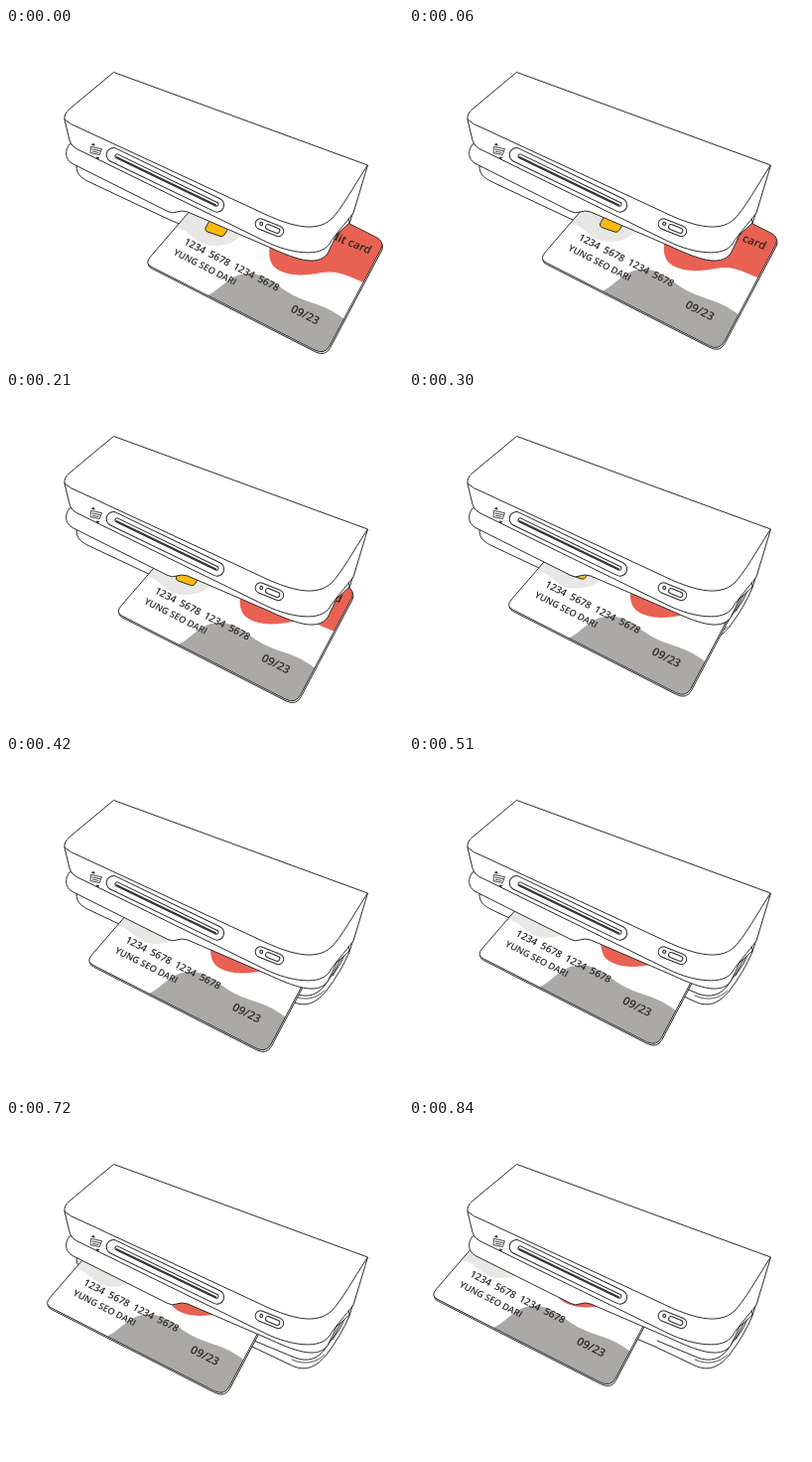
These frames come from a looping animation (400 by 338 pixels, 0.91 s). An HTML page:

```html
<!DOCTYPE html>
<html lang="en">
<head>
<meta charset="utf-8">
<title>Card reader</title>
<style>
  html, body { margin: 0; width: 100%; height: 100%; overflow: hidden; background: #fff; }
  svg { display: block; width: 400px; height: 338px; }
  .line { fill: none; stroke: #2b2b2b; stroke-width: 1; stroke-linecap: round; stroke-linejoin: round; }
  .solid { fill: #fff; }
  .thin { stroke-width: .8; }
  .ink { fill: #2b2b2b; }
  text { font: 600 10px "Open Sans", "Noto Sans", sans-serif; fill: #2b2727; }
  .number { word-spacing: 2.4px; }
  .holder { font-size: 9.2px; }
  .expiry { font-size: 11.4px; }
  .title { font-size: 11.6px; text-anchor: end; }

  .card { animation: swipe 910ms infinite; }
  @keyframes swipe {
    0% { transform: translate(0, 0); animation-timing-function: steps(28, end); }
    92.3077%, 100% { transform: translate(-118px, -60px); }
  }
</style>
</head>
<body>
<svg viewBox="0 0 400 338">
  <defs>
    <path id="face" d="M226 137 L146 229.500 Q139 237 147 240.500 L311 324 Q321 329 326 320 L378 222 Q381 215 374 211 Z"/>
    <clipPath id="edge"><use href="#face"/></clipPath>
  </defs>

  <!-- base -->
  <g class="line">
    <path class="solid" d="M71 139 C71 147 75 150 82 154 L165 193 L248 228 L288 247 C303 254 314 247 323 236 Q338 216 346 197 L352 178 L330 150 Z"/>
    <path d="M250 222 L291 239 C304 244 314 240 321 231 Q331 218 338 203"/>
    <path class="thin" d="M288 241 C301 247 313 244 321 236"/>
    <path d="M329 221 Q338 209 343 196"/>
  </g>

  <!-- card -->
  <g class="card">
    <use href="#face" class="line solid" y="1.8" x=".6"/>
    <use href="#face" class="solid"/>
    <g clip-path="url(#edge)">
      <path fill="#e9e7e4" d="M165 203 C182 195 188 219 208 219 C229 219 238 212 241 196 L226 130 Z"/>
      <path fill="#e96152" d="M276 195 C262 217 263 234 271 241 C284 251 302 249 318 246 C338 243 348 252 362 256 L400 215 L330 170 Z"/>
      <path fill="#aaa9a5" d="M198 271 C219 264 222 247 246 247 C266 248 274 262 292 270 C306 277 322 278 341 293 L320 340 Z"/>
    </g>
    <path class="line" style="fill:#fbb911" d="M209 187 L201 201 Q200 204 203 205 L216 209.500 Q219 210 220 208 L228 195 Z"/>
    <use href="#face" class="line"/>
    <text class="title" transform="matrix(.92 .37 -.44 .88 366 227.500)">credit card</text>
    <text class="number" transform="matrix(.89 .45 -.5 .86 178.500 217)">1234 5678 1234 5678</text>
    <text class="holder" transform="matrix(.89 .45 -.5 .86 168 227.500)">YUNG SEO DARI</text>
    <text class="expiry" transform="matrix(.89 .45 -.5 .86 286 285)">09/23</text>
  </g>

  <!-- head -->
  <g class="line">
    <path class="solid" d="M64 117 C59 123 59 132 67 136.500 L163 184.500 Q168 187 172 185 Q177 183 183 185 L190 188 L262 219 C290 232 313 241 324 227 Q329 217 333 208 L346 196 L340 150 Z"/>
    <path class="solid" d="M59 92 Q58 86.500 64 81.500 L108.500 44.500 L364.500 138 L350 186 C341 198 332 207 326 217 C317 231 287 227 262 215 L75 123.500 Q66 120 64 113 Z"/>
    <path d="M59 92 Q64 97 75 101 L255 184.500 C285 199 312 207 328 192 C338 182 350 160 364 138.500"/>
    <g transform="translate(102.500 121) rotate(25.800)">
      <rect x="1" y="-3.500" width="130" height="14" rx="7"/>
      <rect x="10" y="1" width="115" height="4" rx="2"/>
      <path d="M12 4 H123" stroke-width="1.500"/>
    </g>
    <g transform="translate(265.500 200.500) rotate(22)">
      <rect x="-15" y="-5" width="30" height="10.500" rx="5.200"/>
      <circle cx="-9" cy="-.2" r="1.500"/>
      <rect x="-4" y="-2.300" width="15" height="5" rx="2.500"/>
    </g>
    <g transform="translate(90.500 123.500) rotate(12)" class="thin">
      <path d="M-5.500 -3 H5.500 L4.500 3.200 H-4.500 Z M-4 -.8 H4.500 M-3 1.300 H3"/>
    </g>
  </g>
  <path class="ink" d="M86 118 L88 115.500 L90 118.500 Z M90.500 129.500 L94.500 130 L92.300 132.500 Z"/>
</svg>
</body>
</html>
```
